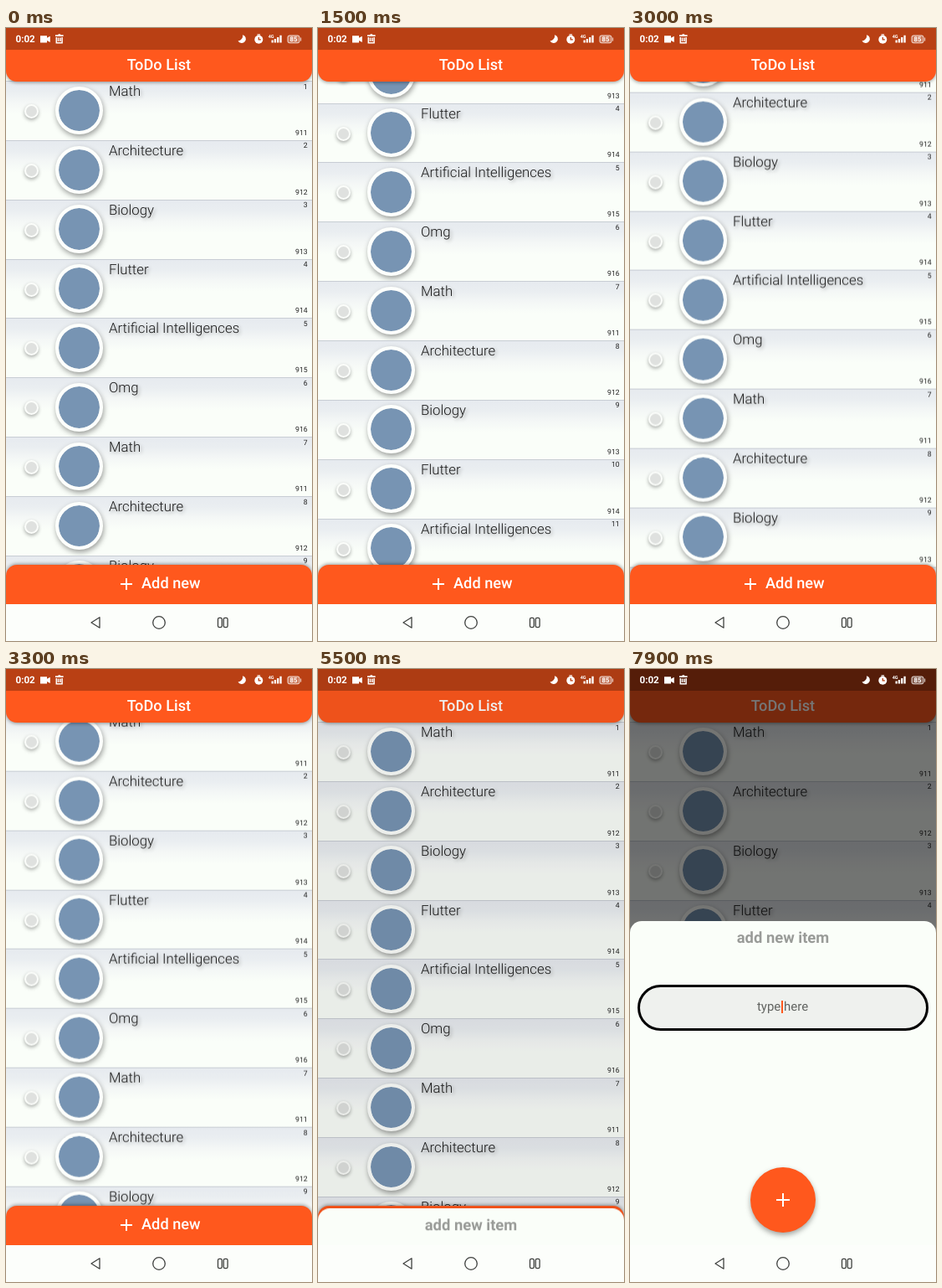
An HTML page for the animation above (8 s loop, 366x732 px).

```html
<!DOCTYPE html>
<html lang="en">
<head>
<meta charset="utf-8">
<title>ToDo List</title>
<style>
  :root { --orange: #ff581d; --paper: #fafef9; }
  html, body { margin: 0; width: 100%; height: 100%; overflow: hidden; background: var(--paper); }
  #stage { position: relative; width: 366px; height: 732px; overflow: hidden; font-family: Roboto, sans-serif; text-rendering: geometricPrecision; }
  #stage div, #stage svg, #stage span { position: absolute; box-sizing: border-box; white-space: nowrap; }
  #list { left: 0; top: 63.1px; width: 366px; }
  .row {
    left: 0; width: 366px; height: 70.85px; box-shadow: inset 0 1px #c8cdd4;
    background: linear-gradient(#e6eaef 0%, #eaeef1 18%, #f4f7f6 36%, var(--paper) 55%);
  }
  .name { left: 123px; top: 3px; font-size: 16.8px; line-height: 20px; font-weight: 300; color: #1c1c1c; text-shadow: 2px 2px 4px rgba(0,0,0,.32); }
  .num { right: 5.3px; font-size: 8.7px; line-height: 10px; color: #222; }
  .avatar { left: 58.7px; top: 6.6px; width: 57.6px; height: 57.6px; border: 4.3px solid #fdfffc; border-radius: 50%; background: #7794b3; background-clip: padding-box; box-shadow: 1px 3px 6px rgba(0,0,0,.38); }
  .check { left: 21.5px; top: 28px; width: 17px; height: 17px; border: 2px solid #fbfdfa; border-radius: 50%; background: #dfe1df; box-shadow: 0 2px 4px rgba(0,0,0,.32); }
  .bar { left: 0; width: 366px; background: var(--orange); color: #fff; font-size: 18.2px; font-weight: 500; }
  #header { top: 20px; height: 43.7px; border-radius: 0 0 13px 13px; line-height: 50px; text-align: center; box-shadow: 0 1px 4px rgba(0,0,0,.4); }
  #add { top: 641.2px; height: 46.8px; border-radius: 13px 13px 0 0; line-height: 46.8px; padding-left: 162px; box-shadow: 0 -1px 4px rgba(0,0,0,.4); }
  #status { left: 0; top: 0; width: 366px; height: 26px; background: #b94014; }
  #scrim { inset: 0; background: #000; opacity: 0; }
  #sheet { left: 0; top: 301px; width: 366px; height: 390px; background: var(--paper); border-radius: 14px 14px 0 0; text-align: center; }
  #sheet .title { left: 0; width: 100%; top: 10px; line-height: 22px; font-size: 18.4px; font-weight: 700; color: #999b98; }
  #field { left: 11.5px; top: 76px; width: 347px; height: 54px; border-radius: 27px; background: #eff1ee; }
  #outline { left: 9px; top: 75.5px; width: 348px; height: 55.5px; border-radius: 28px; border: 3px solid #000; opacity: 0; }
  #sheet .hint { left: 0; width: 365px; top: 92px; line-height: 20px; font-size: 15px; color: #626461; }
  #caret { left: 181.3px; top: 95px; width: 2.2px; height: 15px; background: var(--orange); opacity: 0; }
  #fab { left: 144px; top: 294px; width: 78px; height: 78px; border-radius: 50%; background: var(--orange); box-shadow: 0 3px 6px rgba(0,0,0,.36); }
  #nav { left: 0; top: 688px; width: 366px; height: 44px; background: #fcfefb; }
  #icons { left: 0; top: 0; }
</style>
</head>
<body>
<div id="stage">
  <div id="list"></div>
  <div id="header" class="bar">ToDo List</div>
  <div id="add" class="bar">Add new
    <svg width="14" height="14" style="left:136.5px;top:16.3px"><path d="M7 0V14M0 7H14" stroke="#fff" stroke-width="1.9"/></svg>
  </div>
  <div id="status"></div>
  <div id="scrim"></div>
  <div id="sheet">
    <div class="title">add new item</div>
    <div id="field"></div>
    <div id="outline"></div>
    <div class="hint">type here</div>
    <div id="caret"></div>
    <div id="fab"><svg width="16" height="16" style="left:31px;top:31px"><path d="M8 0V16M0 8H16" stroke="#fff" stroke-width="2"/></svg></div>
  </div>
  <div id="nav"></div>
  <svg id="icons" width="366" height="732" fill="none" font-family="Roboto, sans-serif">
    <g fill="#fff">
      <text x="11.5" y="17.3" font-size="11.6" font-weight="700">0:02</text>
      <path d="M41 9.3h8v2.5l3.8-2.1v7.3l-3.8-2.1v2.5h-8z"/>
      <path d="M59 8.2h3l.8-1h2l.8 1h3v1.7h-9.6z"/>
      <path d="M283 8.200A5 5 0 1 1 277.500 15.500A6 6 0 0 0 283 8.200z"/>
      <circle cx="302.300" cy="13.700" r="5"/>
      <text x="313.700" y="12" font-size="5.500" font-weight="700">4G</text>
      <path d="M317.500 14.500h2.300v3h-2.300zM320.800 13h2.300v4.500h-2.300zM324.100 11h2.300v6.500h-2.300zM327.400 8.800h2.300v8.700h-2.300z"/>
      <rect x="337" y="9" width="14" height="8.800" rx="2" fill-opacity=".3"/>
      <text x="344" y="16.300" font-size="7.800" font-weight="700" text-anchor="middle">85</text>
    </g>
    <path d="M302.300 11v2.900h2.600" stroke="#b94014" stroke-width="1.300"/>
    <g stroke="#fff">
      <path d="M60.300 11v6.800h6.800V11M62.500 11.500v4.500M64.900 11.500v4.500" stroke-width="1.500"/>
      <path d="M300.500 8h3.600" stroke-width="1.300"/>
      <rect x="337" y="9" width="14" height="8.800" rx="2" stroke-opacity=".8"/>
      <path d="M352.700 11.500v4" stroke-opacity=".8"/>
    </g>
    <g stroke="#3e403e" stroke-width="1.300" stroke-linejoin="round">
      <path d="M102 710L112 703.800V716.200Z"/>
      <circle cx="183" cy="710" r="7.300"/>
      <rect x="253.500" y="704.300" width="4.800" height="11.400" rx="1.800"/>
      <rect x="260.300" y="704.300" width="4.800" height="11.400" rx="1.800"/>
    </g>
  </svg>
</div>
<script>
  const LOOP = 8000, STEP = 100, PITCH = 70.85, ROWS = 18;
  const SUBJECTS = ['Math', 'Architecture', 'Biology', 'Flutter', 'Artificial Intelligences', 'Omg'];
  const $ = id => document.getElementById(id);

  $('list').innerHTML = Array.from({ length: ROWS }, (_, i) => {
    const kind = i % SUBJECTS.length;
    return `<div class="row" style="top:${i * PITCH}px">
      <div class="check"></div><div class="avatar"></div>
      <span class="name">${SUBJECTS[kind]}</span>
      <span class="num" style="top:2.5px">${i + 1}</span>
      <span class="num" style="top:57.8px">${911 + kind}</span></div>`;
  }).join('');

  // Each step is [time in ms, value, easing to the next step].
  function play(id, steps, style) {
    const last = steps[steps.length - 1][1];
    const frames = [...steps, [LOOP, last]].map(([time, value, easing = 'linear']) =>
      ({ offset: time / LOOP, easing, ...style(value) }));
    $(id).animate(frames, { duration: LOOP, iterations: Infinity, easing: `steps(${LOOP / STEP})` });
  }
  const shift = y => ({ transform: `translateY(${y}px)` });
  const fade = opacity => ({ opacity });

  play('list', [
    [0, 0], [600, 0, 'ease-in'], [900, -29.5], [1500, -186, 'ease-out'],
    [2000, -250], [2300, -250, 'ease-in'], [2700, -150], [3000, -57.4, 'ease-out'], [3500, 0]
  ], shift);

  const opening = [[0, 0], [5400, 0], [5500, .12], [5600, .6], [5700, .88], [5800, .97], [5900, 1]];
  play('sheet', opening, p => shift((1 - p) * 390));
  play('scrim', opening, p => fade(p * .54));
  play('outline', [[0, 0], [7500, 0], [7700, 1]], fade);
  play('caret', [[0, 0], [7600, 0], [7700, 1]], fade);
</script>
</body>
</html>
```
